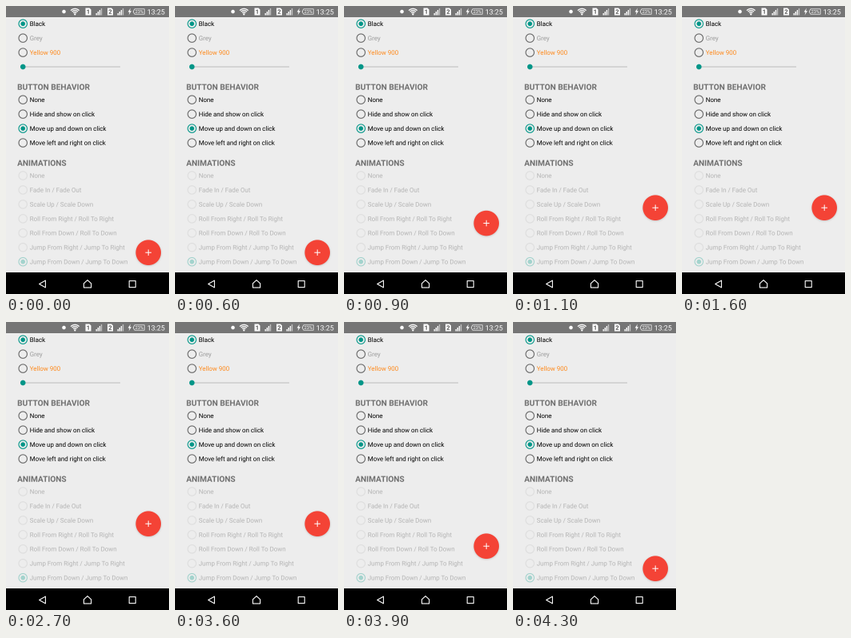
An HTML page with a canvas that plays this animation: 204 px wide and 360 px high, repeating every 4.4 s.

```html
<!DOCTYPE html>
<html lang="en">
<head>
<meta charset="utf-8">
<title>Button behavior settings</title>
<style>
  html, body { margin: 0; width: 100%; height: 100%; overflow: hidden; background: #ededed; }
  canvas { display: block; width: 204px; height: 360px; }
</style>
</head>
<body>
<canvas id="stage"></canvas>
<script>
const W = 204, H = 360, LOOP = 4400, STEP = 100, SCALE = 4;
const TEAL = '#009688', RED = '#f44336', BG = '#ededed', BAR = '#757575';
const stage = document.getElementById('stage');
const view = stage.getContext('2d');
const dpr = window.devicePixelRatio || 1;
stage.width = W * dpr;
stage.height = H * dpr;

// Paint large, then shrink, for smooth unhinted text
const buffer = document.createElement('canvas');
buffer.width = W * SCALE;
buffer.height = H * SCALE;
const ctx = buffer.getContext('2d');
ctx.scale(SCALE, SCALE);

function rect(x, y, w, h, color) {
  ctx.fillStyle = color;
  ctx.fillRect(x, y, w, h);
}

function disc(x, y, r, color) {
  ctx.fillStyle = color;
  ctx.beginPath();
  ctx.arc(x, y, r, 0, Math.PI * 2);
  ctx.fill();
}

function ring(x, y, r, color, width) {
  ctx.strokeStyle = color;
  ctx.lineWidth = width;
  ctx.beginPath();
  ctx.arc(x, y, r, 0, Math.PI * 2);
  ctx.stroke();
}

function poly(points, color, lineWidth) {
  ctx.beginPath();
  points.forEach(([x, y]) => ctx.lineTo(x, y));
  ctx.closePath();
  if (lineWidth) {
    ctx.strokeStyle = color;
    ctx.lineWidth = lineWidth;
    ctx.lineJoin = 'round';
    ctx.stroke();
  } else {
    ctx.fillStyle = color;
    ctx.fill();
  }
}

function text(str, x, y, size, color, weight = 400, align = 'left') {
  ctx.font = `${weight} ${size}px Roboto, sans-serif`;
  ctx.textRendering = 'geometricPrecision';
  ctx.textAlign = align;
  ctx.textBaseline = 'alphabetic';
  ctx.fillStyle = color;
  ctx.fillText(str, x, y);
}

function radio(label, y, color, ringColor, checked) {
  ring(21.2, y, 5.2, ringColor, 1.1);
  if (checked) disc(21.2, y, 2.8, ringColor);
  text(label, 29.7, y + 2.8, 7.95, color);
}

function group(labels, top, selected, colors, off) {
  labels.forEach((label, i) => {
    const on = i === selected;
    const edge = off ? (on ? '#a3d3cd' : '#dedede') : (on ? TEAL : '#666');
    radio(label, top + i * 17.95, off ? '#b4b4b4' : colors[i] || '#000', edge, on);
  });
}

function simCard(x, digit) {
  poly([[x, 2.5], [x + 5, 2.5], [x + 7, 4.5], [x + 7, 11.5], [x, 11.5]], '#fff');
  text(digit, x + 3.4, 9.8, 7.5, '#555', 700, 'center');
}

function signal(x) {
  for (let i = 0; i < 4; i++) {
    const h = 2.5 + i * 2;
    rect(x + i * 2.1, 11.5 - h, 1.4, h, i < 3 ? '#fff' : '#c4c4c4');
  }
}

function statusBar() {
  rect(0, 0, W, 14, BAR);
  disc(72.5, 7, 2.3, '#fff');
  ctx.strokeStyle = '#fff';
  ctx.lineWidth = 1.3;
  for (const r of [2.8, 5, 7.2]) {
    ctx.beginPath();
    ctx.arc(86.3, 10.6, r, -Math.PI * 0.76, -Math.PI * 0.24);
    ctx.stroke();
  }
  disc(86.3, 10.3, 1.2, '#fff');
  simCard(99.5, '1');
  signal(112.5);
  simCard(127, '2');
  signal(139.5);
  poly([[156, 2.5], [152.6, 7.5], [154.6, 7.5], [153.6, 11.5], [157, 6.2], [155, 6.2]], '#fff');
  poly([[161, 3.8], [173.2, 3.8], [173.2, 10.2], [161, 10.2], [159.2, 7]], '#fff', 0.7);
  text('23%', 166.8, 9, 5.6, '#fff', 400, 'center');
  text('13:25', 198.8, 10.4, 8.9, '#fff', 400, 'right');
}

function navBar() {
  rect(0, 333, W, 27, '#000');
  poly([[41.6, 347.5], [49.4, 343.1], [49.4, 351.9]], '#fff', 1.1);
  poly([[102, 342.6], [106.6, 346.8], [106.6, 352], [97.4, 352], [97.4, 346.8]], '#fff', 1.1);
  ctx.strokeStyle = '#fff';
  ctx.lineWidth = 1.1;
  ctx.strokeRect(154.2, 343.6, 8, 8);
}

function slider() {
  rect(21, 75.7, 122, 0.6, '#999');
  disc(21.2, 76, 3.3, TEAL);
}

function fab(y) {
  ctx.save();
  ctx.shadowColor = 'rgba(0,0,0,.18)';
  ctx.shadowBlur = 2.5 * SCALE;
  ctx.shadowOffsetY = 0.7 * SCALE;
  disc(178.2, y, 15.8, RED);
  ctx.restore();
  rect(174.4, y - 0.5, 7.6, 1, '#fff');
  rect(177.7, y - 3.8, 1, 7.6, '#fff');
}

// Accelerate-decelerate progress from start over length
function ease(t, start, length) {
  const p = Math.min(1, Math.max(0, (t - start) / length));
  return (1 - Math.cos(p * Math.PI)) / 2;
}

function draw(t) {
  rect(0, 0, W, H, BG);
  group(['Black', 'Grey', 'Yellow 900'], 22.2, 0, ['#000', '#9e9e9e', '#ff8a1c']);
  slider();
  text('BUTTON BEHAVIOR', 14.1, 104.8, 10.1, '#707070', 700);
  group(['None', 'Hide and show on click', 'Move up and down on click',
         'Move left and right on click'], 117.2, 2, []);
  text('ANIMATIONS', 14.1, 199.8, 10.1, '#707070', 700);
  group(['None', 'Fade In / Fade Out', 'Scale Up / Scale Down',
         'Roll From Right / Roll To Right', 'Roll From Down / Roll To Down',
         'Jump From Right / Jump To Right', 'Jump From Down / Jump To Down'],
        212, 6, [], true);
  fab(308.2 - 56 * (ease(t, 600, 500) - ease(t, 3650, 500)));
  statusBar();
  navBar();
  view.imageSmoothingEnabled = true;
  view.imageSmoothingQuality = 'high';
  view.drawImage(buffer, 0, 0, stage.width, stage.height);
}

const begin = performance.now();
function tick() {
  const t = (performance.now() - begin) % LOOP;
  draw(Math.floor(t / STEP) * STEP);
  requestAnimationFrame(tick);
}
tick();
</script>
</body>
</html>
```
